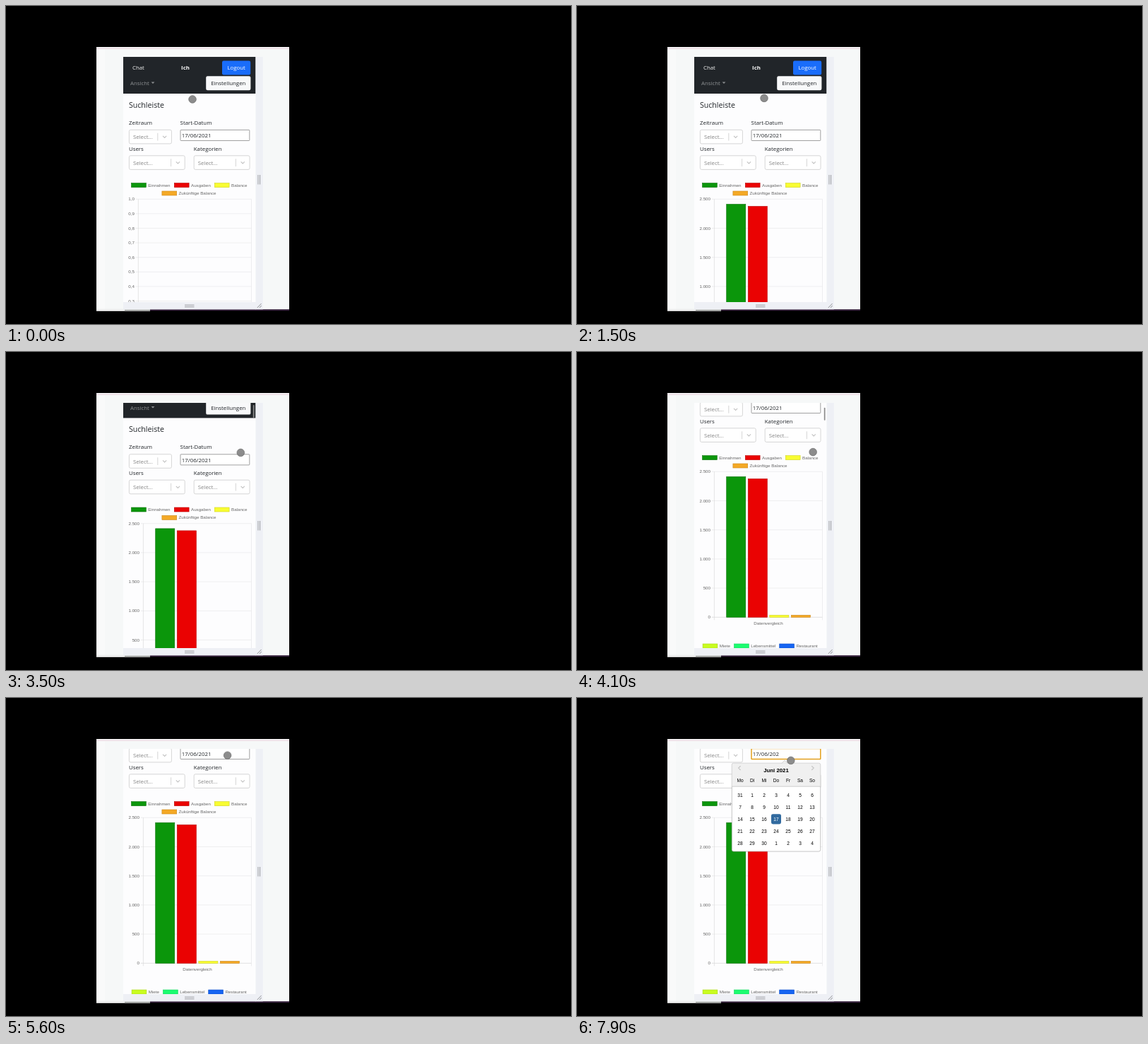
These frames come from a looping animation (800 px wide and 450 px high, 8000 ms). An HTML page:

```html
<!DOCTYPE html>
<html lang="de">
<head>
<meta charset="utf-8">
<title>Suchleiste</title>
<style>
  html, body { margin: 0; width: 100%; height: 100%; overflow: hidden; background: #000; }
  svg { display: block; width: 100vw; height: 100vh; }
  text { white-space: pre; }
  .ui { font: 7.85px "Open Sans", "Noto Sans", sans-serif; fill: #212529; }
  .chart { font: 6.19px "Liberation Sans", Arial, sans-serif; fill: #666; }
  .day { font: 6.6px "Liberation Sans", Arial, sans-serif; fill: #000; }
</style>
</head>
<body>
<svg id="stage" viewBox="0 0 800 450" xmlns="http://www.w3.org/2000/svg"></svg>
<script>
const LOOP = 8000, STEP = 100;
const BASE = 479.3, TOP = 273.3, RIGHT = 347.5;
const stage = document.getElementById('stage');

function add(parent, tag, attrs, content) {
  const el = document.createElementNS('http://www.w3.org/2000/svg', tag);
  for (const key in attrs) el.setAttribute(key, attrs[key]);
  if (content !== undefined) el.textContent = content;
  parent.appendChild(el);
  return el;
}
const group = (parent, attrs = {}) => add(parent, 'g', attrs);
const rect = (parent, x, y, width, height, fill, more = {}) =>
  add(parent, 'rect', { x, y, width, height, fill, ...more });
const text = (parent, cls, x, y, content, more = {}) =>
  add(parent, 'text', { class: cls, x, y, ...more }, content);
const path = (parent, d, stroke, width = 1, fill = 'none') =>
  add(parent, 'path', { d, stroke, 'stroke-width': width, fill });
const show = (el, on) => el.setAttribute('display', on ? 'inline' : 'none');

// Browser window around the phone view
rect(stage, 0, 0, 800, 450, '#000');
rect(stage, 128, 58, 273, 371.7, '#f6f8f8');
rect(stage, 128, 58, 273, 1.5, '#fff');
rect(stage, 128, 59.3, 273, 1.7, '#eedfe6');
rect(stage, 128, 61, 12, 368, '#f9fafa');
rect(stage, 128, 429.3, 76, 2.4, '#fff');
rect(stage, 168, 430, 36, 1, '#8f938f');
rect(stage, 204, 429.3, 197, 1.9, '#3a2340');
rect(stage, 353.5, 72, 10.3, 357.3, '#eef0f5');
rect(stage, 166, 419, 188, 10.3, '#eef0f5');
path(stage, 'M357 239v13.5M359.6 239v13.5M253 423.2h13.5M253 425.8h13.5', '#9a9ca0');
path(stage, 'M355.8 427l5.8-6M359 427l2.8-3', '#85878b', 0.9);

const clip = add(add(stage, 'defs', {}), 'clipPath', { id: 'view' });
rect(clip, 166, 72, 187.5, 347, '#fff');
const view = group(stage, { 'clip-path': 'url(#view)' });
rect(view, 166, 72, 187.5, 347, '#fdfdfe');
const page = group(view);

// Navigation bar
rect(page, 166, 72, 187.5, 52, '#212529');
text(page, 'ui', 179, 90.3, 'Chat', { style: 'fill:#f4f4f4' });
text(page, 'ui', 254, 90.3, 'Ich', { style: 'fill:#fff;font-weight:700', 'text-anchor': 'middle' });
rect(page, 306, 77.6, 40.2, 19.8, '#1a6dfa', { rx: 2.2 });
text(page, 'ui', 326.1, 90.3, 'Logout', { style: 'fill:#fff', 'text-anchor': 'middle' });
text(page, 'ui', 176, 112.2, 'Ansicht', { style: 'fill:#8e9193' });
path(page, 'M205.6 107.6h4.8l-2.4 2.5z', 'none', 0, '#8e9193');
rect(page, 283.2, 99.3, 63.2, 19.9, '#f8f9fa', { rx: 2.2 });
text(page, 'ui', 314.8, 112.2, 'Einstellungen', { 'text-anchor': 'middle' });

// Search form
function select(x, y, width) {
  rect(page, x + 0.4, y, width, 19.6, '#fff', { rx: 2, stroke: '#ccc', 'stroke-width': 0.8 });
  text(page, 'ui', x + 5.9, y + 12.9, 'Select...', { style: 'fill:#868686' });
  path(page, `M${x + width - 19.2} ${y + 4.5}v10.8`, '#ccc', 0.8);
  path(page, `M${x + width - 12} ${y + 8.6}l2.6 2.6l2.6-2.6`, '#c2c2c2', 1.1);
}
text(page, 'ui', 174, 143.8, 'Suchleiste', { style: 'font-size:10.6px;font-weight:500' });
text(page, 'ui', 174, 167.8, 'Zeitraum');
text(page, 'ui', 246.6, 167.8, 'Start-Datum');
text(page, 'ui', 174, 204.6, 'Users');
text(page, 'ui', 265.8, 204.6, 'Kategorien');
select(174, 175.3, 60);
select(174, 211.8, 78.8);
select(265.8, 211.8, 78.8);
const input = rect(page, 247, 175.4, 97.8, 15.1, '#fff', { rx: 0.8 });
const dateText = text(page, 'ui', 248.8, 186.2, '');
const caret = path(page, 'M291.3 177.8v10', '#222', 0.7);

// Bar chart
const legend = (x, y, label, fill, stroke) => {
  rect(page, x + 0.3, y - 3, 20.8, 6, fill, { stroke, 'stroke-width': 0.6 });
  text(page, 'chart', x + 24, y + 2.1, label);
};
const COLORS = [['#0b960b', '#087008'], ['#ea0202', '#b80000'], ['#f8fc32', '#d0d420'], ['#f4a926', '#cb861a']];
legend(177.2, 253.6, 'Einnahmen', ...COLORS[0]);
legend(238, 253.6, 'Ausgaben', ...COLORS[1]);
legend(295, 253.6, 'Balance', ...COLORS[2]);
legend(220.6, 265, 'Zukünftige Balance', ...COLORS[3]);

function axis(left, steps, label) {
  const g = group(page);
  const gap = (BASE - TOP) / steps;
  for (let i = 0; i <= steps; i++) {
    const y = TOP + i * gap;
    path(g, `M${left - 4} ${y}H${RIGHT}`, i === steps ? '#cfcfcf' : '#e5e5e6', 0.6);
    text(g, 'chart', left - 5.4, y + 2.1, label(steps - i), { 'text-anchor': 'end' });
  }
  path(g, `M${left} ${TOP}V${BASE + 4}`, '#d5d5d6', 0.6);
  path(g, `M${RIGHT} ${TOP}V${BASE + 4}`, '#e5e5e6', 0.6);
  return g;
}
const emptyAxis = axis(187.3, 10, n => (n / 10).toFixed(1).replace('.', ','));
const dataAxis = axis(194.4, 5, n => n ? (n * 500).toString().replace(/(\d)(\d{3})$/, '$1.$2') : '0');
text(dataAxis, 'chart', 271, 490.3, 'Datenvergleich', { 'text-anchor': 'middle' });

const bars = [198.8, 195.8, 2.9, 2.9].map((height, i) => ({
  height,
  el: rect(page, 211.7 + i * 30.55, BASE, 27.1, 0, COLORS[i][0], { stroke: COLORS[i][1], 'stroke-width': 0.6 })
}));

// Next chart
legend(177.8, 520, 'Miete', '#c9fc20', '#a9d41a');
legend(222.2, 520, 'Lebensmittel', '#1cfc70', '#16d45e');
legend(286.4, 520, 'Restaurant', '#1664f2', '#1050c8');

// Date picker
const picker = group(page, { transform: 'translate(0 104)' });
rect(picker, 219.3, 92.3, 125.4, 124.8, '#fff', { rx: 2.4, stroke: '#aeaeae', 'stroke-width': 0.7 });
path(picker, 'M219.6 125V94.6q0-2 2-2h120.8q2 0 2 2V125z', 'none', 0, '#f0f0f0');
path(picker, 'M219.6 125.2H344.4', '#aeaeae', 0.6);
path(picker, 'M290 92.4l4.1-4.1l4.1 4.1', '#b5b5b5', 0.6, '#f0f0f0');
path(picker, 'M231.6 96.2l-3 2.9l3 2.9M332.2 96.2l3 2.9l-3 2.9', '#c6c6c6', 1.2);
text(picker, 'day', 282, 105, 'Juni 2021', { 'text-anchor': 'middle', style: 'font-size:7.79px;font-weight:700' });
const cell = (col, y, label, fill = '#000') =>
  text(picker, 'day', 231 + col * 17, y + 2.4, label, { 'text-anchor': 'middle', style: `fill:${fill}` });
['Mo', 'Di', 'Mi', 'Do', 'Fr', 'Sa', 'So'].forEach((name, col) => cell(col, 117, name));
rect(picker, 275, 164.2, 14, 14.2, '#316a9f', { rx: 2.4 });
for (let i = 0; i < 35; i++) {
  const day = i === 0 ? 31 : i > 30 ? i - 30 : i;
  cell(i % 7, 137.1 + Math.floor(i / 7) * 17, day, i === 17 ? '#fff' : '#000');
}

const thumb = rect(view, 349.8, 73, 1.7, 18, '#8b8b8b', { rx: 0.8 });
const pointer = add(stage, 'circle', { r: 5.3, fill: '#858585', 'fill-opacity': 0.94, stroke: '#6c6c6c', 'stroke-width': 0.7 });

// Motion: keys are [time, ...values]
const clamp = v => Math.max(0, Math.min(1, v));
const smooth = v => v * v * (3 - 2 * v);
function track(keys, t, ease = smooth) {
  let i = 0;
  while (i < keys.length - 2 && t >= keys[i + 1][0]) i++;
  const [a, b] = [keys[i], keys[i + 1]];
  const k = ease(clamp((t - a[0]) / (b[0] - a[0])));
  return a.slice(1).map((v, n) => v + (b[n + 1] - v) * k);
}
const POINTER = [
  [400, 264, 132], [1200, 265, 130.4], [2000, 265, 130.4], [3100, 332.3, 142.4], [3600, 332.3, 142.4],
  [4400, 335, 141.2], [5000, 335, 141.2], [5600, 313.6, 81.2], [6000, 300.8, 79.4], [6800, 300.8, 79.4], [7500, 302.8, 88.4]
];
const SCROLL = [[3300, 0], [3500, 30.6], [3700, 52], [4000, 104]];

function draw(t) {
  const [x, y] = track(POINTER, t);
  pointer.setAttribute('cx', x);
  pointer.setAttribute('cy', y);

  const [scroll] = track(SCROLL, t, v => v);
  page.setAttribute('transform', `translate(0 ${-scroll})`);
  thumb.setAttribute('y', 73.5 + scroll * 0.05);
  thumb.setAttribute('opacity', t < 3300 ? 0 : 1 - clamp((t - 4700) / 300));

  const loaded = t >= 400;
  show(emptyAxis, !loaded);
  show(dataAxis, loaded);
  const grow = 1 - Math.pow(1 - clamp((t - 400) / 1100), 4);
  for (const { el, height } of bars) {
    el.setAttribute('y', BASE - height * grow);
    el.setAttribute('height', height * grow);
    show(el, loaded);
  }

  const open = t >= 6100, erased = t >= 7700;
  show(picker, open);
  show(caret, open && !erased && (t - 6100) % 1000 < 500);
  input.setAttribute('stroke', open ? '#e3a01c' : '#8a8a8a');
  input.setAttribute('stroke-width', open ? 1.5 : 0.8);
  dateText.textContent = erased ? '17/06/202' : '17/06/2021';
}

const start = performance.now();
function tick() {
  const t = (performance.now() - start) % LOOP;
  draw(Math.floor(t / STEP) * STEP);
  requestAnimationFrame(tick);
}
draw(0);
requestAnimationFrame(tick);
</script>
</body>
</html>
```
